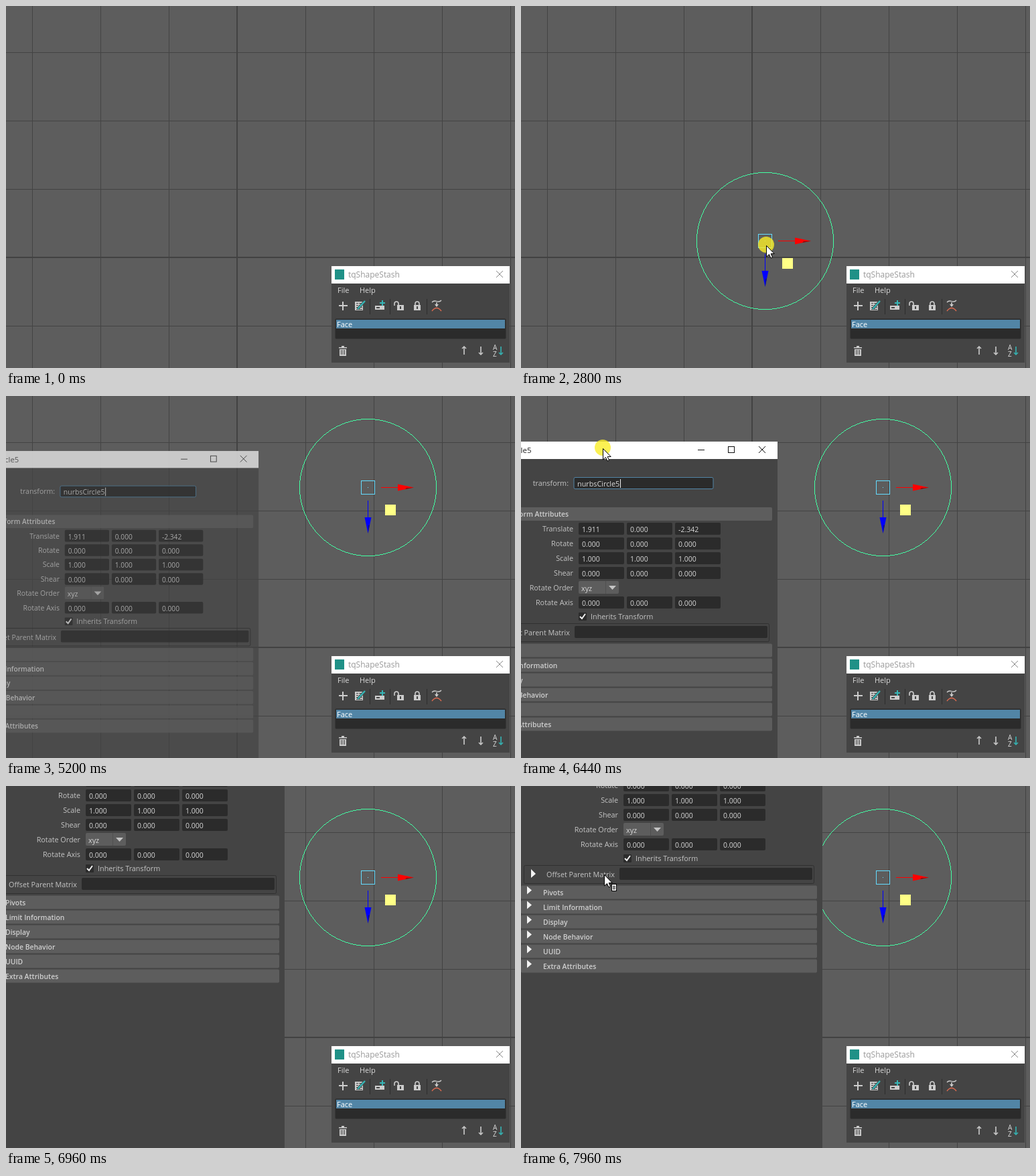
These frames come from a looping animation (760 px wide and 540 px high, 8000 ms). An HTML page with a canvas:

```html
<!DOCTYPE html>
<html lang="en">
<head>
<meta charset="utf-8">
<title>Curve editing demo</title>
<style>
html, body { margin: 0; width: 100%; height: 100%; overflow: hidden; background: #5d5d5d; }
canvas { display: block; }
</style>
</head>
<body>
<canvas id="stage" width="760" height="540"></canvas>
<script>
const g = document.getElementById('stage').getContext('2d');
const LOOP = 8000, STEP = 40;
const FACE = '"Open Sans", "Noto Sans", sans-serif';
const BODY = '#444444', DARK = '#2b2b2b', BAR = '#5d5d5d', BLUE = '#5285a6', LIGHT = '#d8d8d8', TEAL = '#35b5b5', ICON = '#cccccc';

const clamp = v => Math.max(0, Math.min(1, v));

// Eased interpolation through [time, x, y] stops.
function along(stops, t) {
  if (t <= stops[0][0]) return stops[0].slice(1);
  for (let i = 1; i < stops.length; i++) {
    const a = stops[i - 1], b = stops[i];
    if (t <= b[0]) {
      const u = (t - a[0]) / (b[0] - a[0]), e = u * u * (3 - 2 * u);
      return [Math.round(a[1] + (b[1] - a[1]) * e), Math.round(a[2] + (b[2] - a[2]) * e)];
    }
  }
  return stops[stops.length - 1].slice(1);
}

function box(x, y, w, h, color) {
  g.fillStyle = color;
  g.fillRect(x, y, w, h);
}

function round(x, y, w, h, r, fill, edge) {
  g.beginPath();
  g.roundRect(x, y, w, h, r);
  if (fill) { g.fillStyle = fill; g.fill(); }
  if (edge) { g.strokeStyle = edge; g.lineWidth = 1; g.stroke(); }
}

function shape(points, color) {
  g.beginPath();
  points.forEach(([x, y]) => g.lineTo(x, y));
  g.closePath();
  g.fillStyle = color;
  g.fill();
}

function line(points, color, width = 1) {
  g.beginPath();
  points.forEach(([x, y]) => g.lineTo(x, y));
  g.strokeStyle = color;
  g.lineWidth = width;
  g.stroke();
}

function label(s, x, y, { size = 10.8, color = LIGHT, align = 'left', weight = 400 } = {}) {
  g.font = `${weight} ${size}px ${FACE}`;
  g.textAlign = align;
  g.fillStyle = color;
  g.fillText(s, x, y);
}

function cross(x, y, r, color) {
  line([[x - r, y - r], [x + r, y + r]], color);
  line([[x + r, y - r], [x - r, y + r]], color);
}

function grid() {
  box(0, 0, 760, 540, '#5d5d5d');
  for (let x = 39; x < 760; x += 102) box(x, 0, 1, 540, '#434343');
  for (let y = 69; y < 540; y += 102) box(0, y, 760, 1, '#434343');
  box(344, 0, 2, 540, '#424242');
  box(0, 374, 760, 2, '#424242');
}

const circlePath = [[2480, 345, 375], [2800, 364, 350], [2840, 364, 350], [3280, 540, 136]];

function curve(t) {
  const [cx, cy] = along(circlePath, t), r = 102;
  const active = t >= 2520;
  g.fillStyle = '#43ffa3';
  for (let i = 0; i <= 72; i++) {
    const d = Math.round(Math.sqrt(r * r - i * i));
    for (const [x, y] of [[i, d], [d, i]])
      for (const sx of [-1, 1]) for (const sy of [-1, 1])
        g.fillRect(cx + sx * x, cy + sy * y, 1, 1);
  }
  box(cx + 20, cy, 26, 1, active ? '#ff0000' : '#2e2e2e');
  box(cx, cy + 20, 1, 26, active ? '#0000ff' : '#2e2e2e');
  shape([[cx + 45, cy - 4.5], [cx + 69, cy + .5], [cx + 45, cy + 5.5]], '#ff0000');
  shape([[cx + 58, cy + 1], [cx + 69, cy + .5], [cx + 56, cy + 3]], '#7a1010');
  shape([[cx - 4.5, cy + 45], [cx + 5.5, cy + 45], [cx + .5, cy + 69]], '#0000ff');
  shape([[cx + 1, cy + 57], [cx + 3, cy + 56], [cx + .5, cy + 69]], '#101080');
  const tint = active ? '#64dcff' : '#bdbdbd';
  g.strokeStyle = tint;
  g.lineWidth = 1;
  g.strokeRect(cx - 9.5, cy - 9.5, 20, 20);
  box(cx, cy, 1, 1, tint);
  box(cx + 26, cy + 26, 16, 16, '#ffff86');
}

const sections = ['Pivots', 'Limit Information', 'Display', 'Node Behavior', 'UUID', 'Extra Attributes'];
const rows = [
  ['Translate', 198, '1.911', '0.000', '-2.342'],
  ['Rotate', 220, '0.000', '0.000', '0.000'],
  ['Scale', 242, '1.000', '1.000', '1.000'],
  ['Shear', 264, '0.000', '0.000', '0.000'],
  ['Rotate Order', 286],
  ['Rotate Axis', 308, '0.000', '0.000', '0.000']
];

function sectionBar(name, y, open) {
  round(-67, y, 442, 20, 2, BAR);
  if (open) shape([[-61, y + 6], [-49, y + 6], [-55, y + 12]], '#eeeeee');
  else shape([[-58, y + 1], [-51, y + 7], [-58, y + 13]], '#f4f4f4');
  label(name, -34, y + 14, { size: 10.4, weight: 600, color: '#d0d0d0' });
}

function editorBody() {
  box(-75, 68, 458, 1078, BODY);
  box(-75, 68, 458, 26, '#ffffff');
  label('nurbsCircle5', 15.5, 85, { size: 11.5, color: '#222', align: 'right' });
  box(264, 80, 10, 1, '#111');
  g.strokeStyle = '#111';
  g.lineWidth = 1;
  g.strokeRect(309.5, 75.5, 9, 9);
  cross(360, 80, 5, '#111');

  label('transform:', 71, 134, { align: 'right', color: '#c4c4c4' });
  round(79, 121.5, 208, 17, 2, DARK, BLUE);
  label('nurbsCircle5', 84, 135);
  box(148, 124, 1, 13, '#eeeeee');

  sectionBar('Transform Attributes', 166, true);
  for (const [name, y, ...vals] of rows) {
    label(name, 78, y + 4, { align: 'right', color: '#c4c4c4' });
    vals.forEach((v, i) => {
      round(86 + 72 * i, y - 9, 68, 18, 2, DARK);
      label(v, 91 + 72 * i, y + 5, { size: 10.5 });
    });
  }
  round(86, 276, 60, 19, 2, BAR);
  box(126, 276, 1, 19, '#505050');
  label('xyz', 90, 291);
  shape([[131, 283], [142, 283], [136.5, 289]], '#c4c4c4');

  round(86, 323, 12, 12, 1, DARK);
  line([[88, 329], [91, 332], [96, 325]], '#f0f0f0', 2);
  label('Inherits Transform', 104, 333, { color: '#c4c4c4' });

  round(-62.5, 339.5, 433, 27, 2, null, '#303030');
  shape([[-52, 345], [-45, 352], [-52, 358]], '#f4f4f4');
  label('Offset Parent Matrix', -29, 357, { color: '#c4c4c4' });
  round(80, 343, 288, 18, 2, DARK);

  sections.forEach((name, i) => sectionBar(name, 369.5 + 22 * i));
}

const dragPath = [[6500, 0, 0], [6840, 43, -210], [6880, 43, -210], [6960, 33, -206],
  [7240, 40, -212], [7400, 40, -212], [7600, 67, -221]];

function editor(t) {
  const [dx, dy] = along(dragPath, t);
  const u = clamp((t - 5200) / 200), s = 1 - .026 * (1 - u) * (1 - u);
  g.save();
  g.globalAlpha = .7 + .3 * u;
  g.translate(154 + dx, 607 + dy);
  g.scale(s, s);
  g.translate(-154, -607);
  editorBody();
  g.restore();
}

function padlock(x, open) {
  box(x, 446, 10, 8, ICON);
  box(x + 4, 448, 2, 4, BODY);
  const sx = open ? x - 4 : x + 2;
  g.beginPath();
  g.moveTo(sx, open ? 447 : 446);
  g.lineTo(sx, 444);
  g.arc(sx + 3, 444, 3, Math.PI, 0);
  g.lineTo(sx + 6, 446);
  g.strokeStyle = ICON;
  g.lineWidth = 1.6;
  g.stroke();
}

function arrow(x, dir, color) {
  line([[x, 514 - 6 * dir], [x, 514 + 6 * dir]], color, 1.6);
  line([[x - 3, 514 + 3 * dir], [x, 514 + 6 * dir], [x + 3, 514 + 3 * dir]], color, 1.5);
}

function toolbar() {
  box(497, 446, 13, 2, ICON);
  box(502, 441, 2, 13, ICON);
  for (const x of [543, 573, 628]) box(x, 437, 1, 23, '#2e2e2e');

  box(521, 441, 12, 13, ICON);
  for (let y = 443; y < 454; y += 3) { box(523, y, 3, 1, BODY); box(527, y, 5, 1, BODY); }
  line([[525, 452], [535, 441]], BODY, 4);
  line([[525, 452], [536, 440]], TEAL, 2.4);

  box(551, 447, 14, 6, ICON);
  box(553, 449, 5, 2, BODY);
  box(557, 438, 10, 9, BODY);
  box(558, 442, 8, 2, TEAL);
  box(561, 439, 2, 8, TEAL);

  padlock(584, true);
  padlock(609, false);

  g.beginPath();
  g.moveTo(636, 442);
  g.bezierCurveTo(641, 436, 645, 445, 650, 439);
  g.strokeStyle = ICON;
  g.lineWidth = 1.3;
  g.stroke();
  line([[643, 442], [643, 447]], ICON, 1.6);
  shape([[640, 445], [646, 445], [643, 449]], ICON);
  g.beginPath();
  g.moveTo(636, 455);
  g.quadraticCurveTo(643, 446, 650, 455);
  g.strokeStyle = '#d9694f';
  g.lineWidth = 1.5;
  g.stroke();
}

function depot() {
  box(486, 388, 266, 144, BODY);
  box(486, 388, 266, 26, '#ffffff');
  box(491, 393, 14, 15, '#1f9187');
  label('tqShapeStash', 511, 405, { size: 12, color: '#999' });
  cross(737, 400, 5, '#888');
  label('File', 495, 428, { size: 11 });
  label('Help', 528, 428, { size: 11 });
  toolbar();

  round(491.5, 466.5, 255, 30, 2, DARK, '#383838');
  box(493, 468, 252, 13, BLUE);
  label('Face', 494, 479, { size: 11, color: '#fff' });

  box(497, 509, 12, 1.5, ICON);
  box(501, 507, 4, 2, ICON);
  box(498, 512, 10, 10, ICON);
  for (const x of [500, 502.5, 505]) box(x, 513, 1, 7, BODY);
  arrow(684, -1, ICON);
  arrow(709, 1, ICON);
  label('A', 727, 513, { size: 10 });
  label('Z', 727, 523, { size: 10 });
  arrow(739, 1, TEAL);
}

function pointer(x, y, pressed, menu) {
  if (pressed) {
    g.beginPath();
    g.arc(x, y - 1, 12, 0, 7);
    g.fillStyle = 'rgba(250,238,40,.8)';
    g.fill();
  }
  const tip = [[0, 0], [0, 16.5], [4, 13], [6.5, 18.5], [9, 17.5], [6.7, 12], [11.7, 12]]
    .map(([a, b]) => [x + a + .5, y + b + .5]);
  shape(tip, '#ffffff');
  line([...tip, tip[0]], '#000000');
  if (menu) {
    box(x + 11, y + 14, 8, 11, '#000');
    box(x + 12, y + 15, 6, 9, '#fff');
    for (let i = 0; i < 3; i++) box(x + 13, y + 17 + 2 * i, 4, 1, '#000');
  }
}

const approach = [[2000, 64, 167], [2480, 347, 382]];
const reach = [[5680, 579, 260], [6400, 122, 78]];
const hover = [[7760, 143, 42], [7960, 124, 132]];

function cursor(t) {
  if (t >= 2000 && t < 3440) {
    if (t < 2480) pointer(...along(approach, t));
    else {
      const [x, y] = along(circlePath, t);
      pointer(x + 2, y + 7, true);
    }
  } else if (t >= 5680 && t < 6440) {
    pointer(...along(reach, t));
  } else if (t >= 6440 && t < 7600) {
    const [dx, dy] = along(dragPath, t);
    pointer(122 + dx, 78 + dy, true);
  } else if (t >= 7760) {
    pointer(...along(hover, t), false, true);
  }
}

function draw(now) {
  const t = Math.floor((now % LOOP) / STEP) * STEP;
  grid();
  if (t >= 1720) curve(t);
  if (t >= 5200) editor(t);
  depot();
  cursor(t);
}

let start;
function tick(now) {
  start ??= now;
  draw(now - start);
  requestAnimationFrame(tick);
}
draw(0);
requestAnimationFrame(tick);
</script>
</body>
</html>
```
